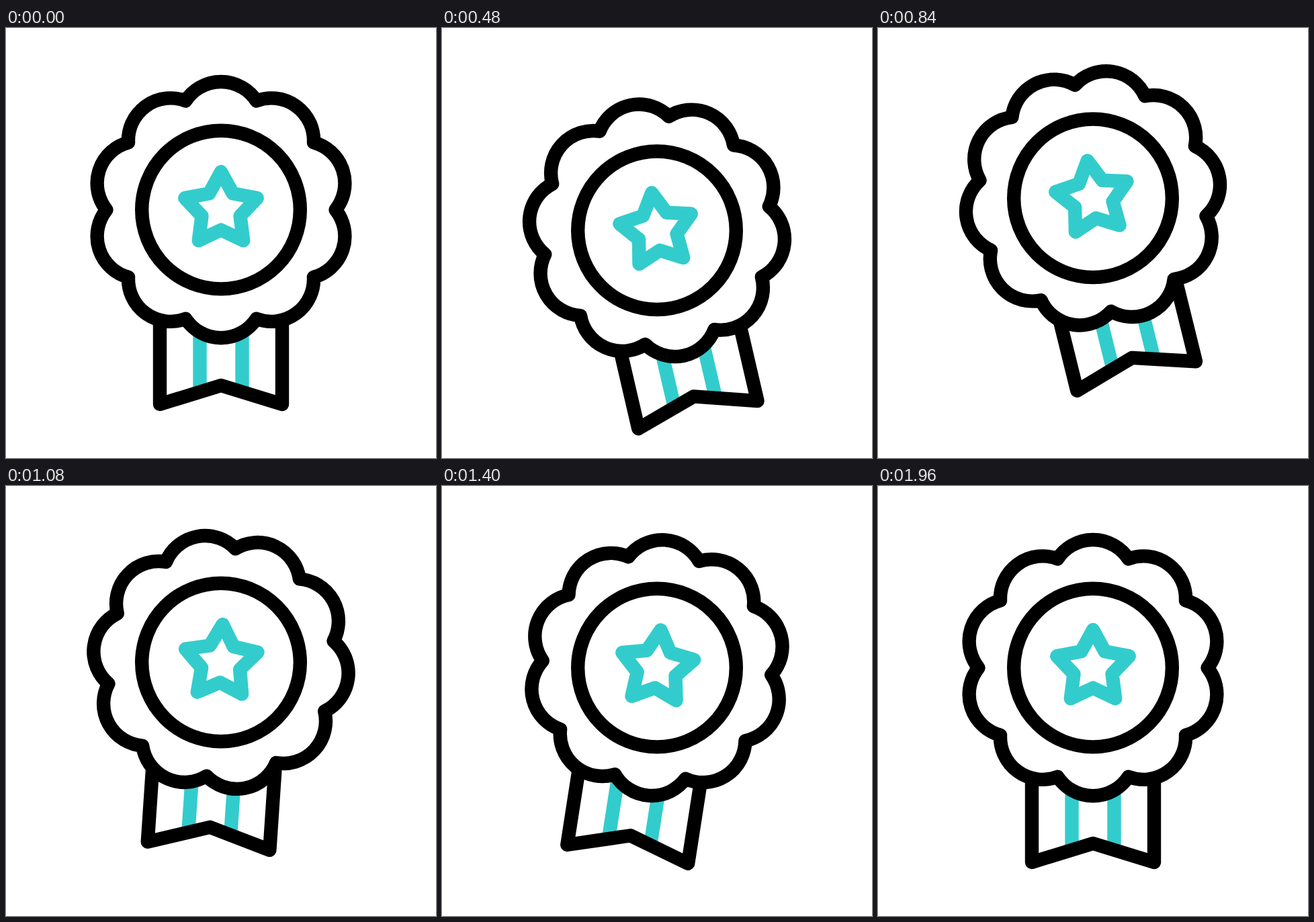
An HTML page for the animation above (2000 ms loop, 640 by 640 pixels).

```html
<!DOCTYPE html>
<html lang="en">
<head>
<meta charset="utf-8">
<title>Award badge</title>
<style>
  html, body { margin: 0; height: 100%; overflow: hidden; background: #fff; }
  svg { display: block; width: 100vw; height: 100vh; }
  path, circle { fill: none; stroke: #000; stroke-width: 20.4; stroke-linecap: round; stroke-linejoin: round; }
  .teal { stroke: #3cc; }
  .flat { stroke-linecap: butt; }
  #petals { fill: #fff; }
</style>
</head>
<body>
<svg viewBox="0 0 640 640">
  <g id="ribbon">
    <path class="teal flat" d="M-31.5 150V246M31.5 150V246"/>
    <path d="M-91 150V270L0 242L91 270V150"/>
  </g>
  <path id="petals"/>
  <circle id="ring" r="117.8"/>
  <path id="star" class="teal"/>
</svg>
<script>
const $ = id => document.getElementById(id);
const LOOP = 2000, STEP = 40, CX = 320, CY = 270.6, PIVOT = 290;

// Point at a radius and a clockwise angle from the top
const polar = (r, deg) => {
  const a = deg * Math.PI / 180;
  return `${(r * Math.sin(a)).toFixed(2)} ${(-r * Math.cos(a)).toFixed(2)}`;
};
const ten = [...Array(10).keys()];
$('petals').setAttribute('d', `M${polar(170.5, -18)}` +
  ten.map(i => `A63 63 0 0 1 ${polar(170.5, 18 + 36 * i)}`).join('') + 'Z');
$('star').setAttribute('d', 'M' + ten.map(i => polar(i % 2 ? 30 : 56.5, 36 * i)).join('L') + 'Z');

// Keys are [ms, value], eased in and out between neighbours
const tracks = {
  bounce: [[0, 0], [440, 31.8], [890, -19], [1236, 0]],
  swing: [[0, 0], [720, -17.6], [1240, 10.1], [1960, 0]],
  tilt: [[0, 0], [720, -10.8], [1240, 6.4], [1960, 0]],
  spin: [[0, 0], [567, 64], [1121, -48.5], [1845, 0]],
  lift: [[100, 0], [890, -17], [1940, 0]],
  slide: [[1000, 0], [1350, -2.4], [1960, 0]]
};
function at(keys, t) {
  const n = keys.findIndex(k => k[0] > t);
  if (n < 0) return keys[keys.length - 1][1];
  if (n === 0) return keys[0][1];
  const [t0, a] = keys[n - 1], [t1, b] = keys[n];
  const p = (t - t0) / (t1 - t0);
  return a + (b - a) * p * p * (3 - 2 * p);
}

const place = (id, x, y, turn = 0) =>
  $(id).setAttribute('transform', `translate(${x} ${y}) rotate(${turn})`);

function draw(now) {
  const t = Math.floor(now % LOOP / STEP) * STEP;
  const v = name => at(tracks[name], t);
  const y = CY + v('bounce');
  place('ribbon', CX + v('slide'), PIVOT + v('bounce') + v('lift'), v('swing'));
  place('petals', CX, y, v('spin'));
  place('ring', CX, y);
  place('star', CX, y, v('tilt'));
}

let start;
function frame(now) {
  start ??= now;
  draw(now - start);
  requestAnimationFrame(frame);
}
draw(0);
requestAnimationFrame(frame);
</script>
</body>
</html>
```
